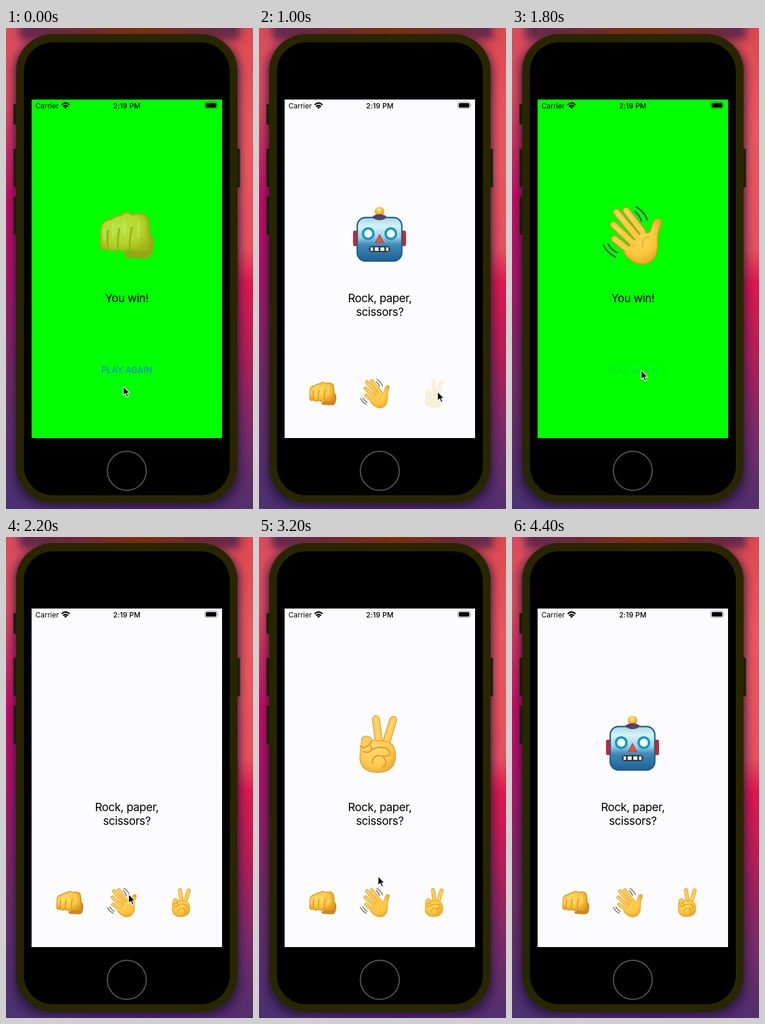
Animation, 415 px wide and 807 px high, one loop 4.6 s. Source, as an HTML page:

```html
<!DOCTYPE html>
<html lang="en">
<head>
<meta charset="utf-8">
<title>Rock, paper, scissors</title>
<style>
  html, body { margin: 0; width: 100%; height: 100%; overflow: hidden; background: #000; }
  svg { display: block; width: 415px; height: 807px; }
  text { font-family: Inter, Roboto, sans-serif; }
  .status { font-size: 12px; }
  .message { font-size: 19px; letter-spacing: -.42px; text-anchor: middle; }
  .again { font-size: 14.3px; letter-spacing: .15px; text-anchor: middle; fill: #007aff; }
</style>
</head>
<body>
<svg viewBox="0 0 415 807">
  <defs>
    <linearGradient id="wallLeft" x2="0" y2="1">
      <stop offset="0" stop-color="#d84c5c"/>
      <stop offset=".14" stop-color="#e04c5c"/>
      <stop offset=".25" stop-color="#d22c60"/>
      <stop offset=".36" stop-color="#cc0866"/>
      <stop offset=".52" stop-color="#b01468"/>
      <stop offset=".72" stop-color="#782c68"/>
      <stop offset="1" stop-color="#4a3270"/>
    </linearGradient>
    <linearGradient id="wallRight" x2="0" y2="1">
      <stop offset="0" stop-color="#dc484e"/>
      <stop offset=".2" stop-color="#ea565f"/>
      <stop offset=".46" stop-color="#e6505e"/>
      <stop offset=".53" stop-color="#dc184c"/>
      <stop offset=".68" stop-color="#b41e58"/>
      <stop offset=".83" stop-color="#7c2a66"/>
      <stop offset="1" stop-color="#50306c"/>
    </linearGradient>
    <linearGradient id="wallTop">
      <stop offset="0" stop-color="#642850"/>
      <stop offset=".25" stop-color="#702a38"/>
      <stop offset=".55" stop-color="#803008"/>
      <stop offset="1" stop-color="#642850"/>
    </linearGradient>
    <linearGradient id="wallBottom">
      <stop offset="0" stop-color="#4a3270"/>
      <stop offset=".6" stop-color="#602070"/>
      <stop offset="1" stop-color="#54306c"/>
    </linearGradient>
    <filter id="soft" filterUnits="userSpaceOnUse" x="-60" y="-60" width="535" height="927">
      <feGaussianBlur stdDeviation="7"/>
    </filter>
    <radialGradient id="skin" cx=".42" cy=".38" r=".72">
      <stop offset="0" stop-color="#ffd95e"/>
      <stop offset=".6" stop-color="#fcc53e"/>
      <stop offset="1" stop-color="#e39a1e"/>
    </radialGradient>
    <linearGradient id="metal" x2="0" y2="1">
      <stop offset="0" stop-color="#a9d6dc"/>
      <stop offset=".2" stop-color="#d2f4f8"/>
      <stop offset=".45" stop-color="#a2d0e2"/>
      <stop offset=".62" stop-color="#3f8bb8"/>
      <stop offset="1" stop-color="#1f6097"/>
    </linearGradient>
    <radialGradient id="bulb" cx=".45" cy=".3">
      <stop offset="0" stop-color="#fff08a"/>
      <stop offset="1" stop-color="#f2a51d"/>
    </radialGradient>

    <g id="rock" stroke-linecap="round" stroke-linejoin="round">
      <path fill="#cf8620" d="M-3 29C-5 35-2 38 6 38L32 39C40 39 43 32 45 22C47 12 46 4 40-3L20 20Z"/>
      <path fill="#dc9724" d="M-44-8C-45-20-36-29-26-28C-22-34-14-35-9-35C-4-41 4-41 9-36C18-38 30-40 36-31C40-20 39-12 40-3C42 10 40 22 32 26C24 29 12 28 6 24C0 29-11 28-14 24C-20 28-28 27-31 23C-38 27-45 23-45 15Z"/>
      <path fill="url(#skin)" d="M-42-8C-43-18-35-26-25-25C-21-31-13-32-8-32C-3-38 4-38 9-33C18-35 28-37 32-29C36-20 34-12 35-3C36 10 36 19 29 23C22 26 12 25 6 21C0 26-11 25-14 21C-20 25-28 24-31 20C-37 24-42 20-42 13Z"/>
      <path fill="none" stroke="#d99321" stroke-width="3" d="M-31 21C-33 12-32 2-31-8M-14 22C-16 10-14 0-12-11M6 22C4 8 7-2 9-13"/>
      <path fill="none" stroke="#ffe68c" stroke-width="4" opacity=".6" d="M-37-10V5M-22-18V2M-3-23V0M20-24V2"/>
    </g>

    <g id="paper" fill="none" stroke-linecap="round" stroke-linejoin="round">
      <path stroke="#dc9320" stroke-width="12" d="M-11-42L17-6M-27-39L9 4M-32-18L4 16M-30 6L0 30"/>
      <path fill="url(#skin)" stroke="#dc9320" stroke-width="1.5" d="M19-10C21-1 29-3 31-10C33-20 36-28 43-28C49-28 49-21 46-14C42-5 42 3 42 14C42 34 34 47 17 48C3 48-8 38-15 29Z"/>
      <path stroke="#fec848" stroke-width="9" d="M-11-42L17-6M-27-39L9 4M-32-18L4 16M-30 6L0 30"/>
      <path stroke="#e5a02c" stroke-width="1.6" d="M27 1C18 4 15 12 17 20"/>
      <path stroke="#ffe08a" stroke-width="2.6" opacity=".6" d="M-11-41L-1-28M-26-37L-13-22M-31-16L-20-6"/>
      <path stroke="#575757" stroke-width="2.6" d="M6-48Q19-41 25-26M4-40Q12-34 15-24M-49 16Q-42 30-29 36M-41 14Q-37 23-26 29"/>
    </g>

    <g id="scissors" fill="none" stroke-linecap="round" stroke-linejoin="round">
      <path stroke="#e09a28" stroke-width="13.5" d="M23-41L9 4M-6-42L0 4"/>
      <path stroke="#fec848" stroke-width="10.5" d="M23-41L9 4M-6-42L0 4"/>
      <path fill="url(#skin)" stroke="#e09a28" stroke-width="1.5" d="M-30-8C-27-17-16-15-12-7C-2-6 12-8 21 0C29 9 28 26 23 35C17 45 5 47-5 47C-22 47-33 38-33 22Z"/>
      <path stroke="#d98f22" stroke-width="2.2" d="M-32 3C-26 8-18 3-13-6M-15 2C-10 11-18 15-27 12M-13 9C0 2 13 5 17 11C20 18 12 22 4 19C-7 17-13 23-12 32M5 20C13 27 12 35 6 38"/>
      <path stroke="#ffe08a" stroke-width="3" opacity=".6" d="M22-39L13-11M-6-40L-2-11"/>
    </g>

    <g id="robot">
      <rect x="-44.5" y="-8" width="9" height="26" rx="3" fill="#c42836"/>
      <rect x="35.5" y="-8" width="9" height="26" rx="3" fill="#c42836"/>
      <circle cy="-40" r="8" fill="url(#bulb)"/>
      <rect x="-37.5" y="-30" width="75" height="73" rx="14" fill="url(#metal)" stroke="#245f8a" stroke-width="2.4"/>
      <path fill="#4f4270" d="M-12-31C-8-37 8-37 12-31C8-24-8-24-12-31Z"/>
      <g fill="#fff" stroke="#129ac8" stroke-width="4">
        <circle cx="-19" cy="-3" r="8.8"/><circle cx="19" cy="-3" r="8.8"/>
      </g>
      <path fill="#e2504c" stroke="#a93a42" stroke-linejoin="round" d="M0-2L7 12H-7Z"/>
      <rect x="-18" y="18" width="36" height="10" rx="5" fill="#33383d"/>
      <path stroke="#f4f7ee" stroke-width="6" d="M-15 23h4M-8 23h6.500M1.500 23h6.500M11 23h4"/>
    </g>
  </defs>

  <rect width="208" height="807" fill="url(#wallLeft)"/>
  <rect x="207" width="208" height="807" fill="url(#wallRight)"/>
  <rect y="785" width="415" height="22" fill="url(#wallBottom)"/>
  <rect x="22" y="-25" width="371" height="45" fill="url(#wallTop)" filter="url(#soft)"/>
  <rect x="13" y="16" width="380" height="788" rx="58" fill="#24123e" filter="url(#soft)" opacity=".8"/>

  <g fill="#1d1a12" stroke="#3a3420">
    <rect x="12.5" y="127.5" width="8" height="35" rx="2"/>
    <rect x="12.5" y="202.5" width="8" height="65" rx="2"/>
    <rect x="12.5" y="282.5" width="8" height="65" rx="2"/>
    <rect x="385" y="202.5" width="8" height="65" rx="2"/>
  </g>
  <rect x="17" y="10" width="372" height="787" rx="62" fill="#282600"/>
  <rect x="30" y="24" width="346" height="760" rx="49"/>
  <circle cx="203" cy="743" r="32.7" fill="none" stroke="#555559" stroke-width="2"/>
  <rect id="screen" x="43" y="120" width="320" height="568"/>

  <g class="status">
    <text x="49.5" y="134.5">Carrier</text>
    <text x="203" y="134.5" text-anchor="middle" font-weight="500" letter-spacing=".1">2:19 PM</text>
    <g fill="none" stroke="#000" stroke-width="2.3">
      <path d="M93.5 129Q100 122.5 106.8 129M96 132Q100 128 104.3 132"/>
      <path d="M97.7 133.2Q100 131 102.5 133.2L100 135.8Z" fill="#000" stroke="none"/>
    </g>
    <rect x="334" y="124.5" width="21" height="10.5" rx="3" fill="none" stroke="#000" opacity=".4"/>
    <rect x="335.7" y="126" width="17.6" height="7.5" rx="1.7"/>
    <path d="M356.3 128q1.7 1.7 0 3.5z" opacity=".4"/>
  </g>

  <use id="sign" transform="translate(202.5 348)"/>
  <text class="message" x="203" y="459.5" id="line1"></text>
  <text class="message" x="203" y="483" id="line2"></text>
  <text class="again" x="203" y="578.5" id="again">PLAY AGAIN</text>
  <g id="choices">
    <use href="#rock" transform="translate(107 613.5) scale(.5)"/>
    <use href="#paper" transform="translate(195 613.5) scale(.5)"/>
    <use href="#scissors" transform="translate(295.5 613.5) scale(.5)"/>
  </g>
  <path id="cursor" d="M0 0V15.5L3.6 12.3L6 18L8.6 16.9L6.3 11.4H11Z" stroke="#fff" stroke-width="1.2" stroke-linejoin="round"/>
</svg>
<script>
const STEP = 200, PRESSED = 0.2;
const modes = {
  win:  { color: '#00ff00', lines: ['You win!', ''] },
  lose: { color: '#ff0000', lines: ['You lose!', ''] },
  ask:  { color: '#fcfcfe', lines: ['Rock, paper,', 'scissors?'] }
};

// mode, sign, sign opacity, cursor x, cursor y, pressed control
const steps = [
  ['win', 'rock', 0.72, 197, 601],
  ['win', 'rock', 1, 197, 588],
  ['win', 'rock', 1, 198, 575, 'again'],
  ['ask', 'rock', 0.93, 198, 579],
  ['ask', 'robot', 0, 250, 598],
  ['ask', 'robot', 1, 300, 610, 'scissors'],
  ['win', 'robot', 0.68, 300, 610],
  ['win', 'paper', 0, 262, 594],
  ['win', 'paper', 0.7, 217, 574],
  ['win', 'paper', 1, 217, 574, 'again'],
  ['ask', 'paper', 0.9, 216, 576],
  ['ask', 'robot', 0, 206, 599],
  ['ask', 'robot', 1, 205, 601, 'paper'],
  ['lose', 'robot', 0, 205, 601],
  ['lose', 'scissors', 0.6, 200, 569],
  ['lose', 'scissors', 1, 200, 569, 'again'],
  ['ask', 'scissors', 0.9, 200, 569],
  ['ask', 'robot', 0, 200, 569],
  ['ask', 'robot', 0.8, 200, 569],
  ['ask', 'robot', 1, 215, 584],
  ['ask', 'robot', 1, 255, 625],
  ['ask', 'robot', 1, 322, 690],
  ['ask', 'robot', 1, 430, 810]
];

const el = Object.fromEntries(
  ['screen', 'sign', 'line1', 'line2', 'again', 'choices', 'cursor']
    .map(id => [id, document.getElementById(id)]));
let shown = -1;

function draw([modeName, sign, opacity, x, y, pressed]) {
  const mode = modes[modeName], asking = modeName === 'ask';
  el.screen.setAttribute('fill', mode.color);
  el.sign.setAttribute('href', '#' + sign);
  el.sign.setAttribute('opacity', opacity);
  [el.line1.textContent, el.line2.textContent] = mode.lines;
  el.again.style.display = asking ? 'none' : '';
  el.again.setAttribute('opacity', pressed === 'again' ? PRESSED : 1);
  el.choices.style.display = asking ? '' : 'none';
  for (const choice of el.choices.children)
    choice.setAttribute('opacity', choice.getAttribute('href') === '#' + pressed ? PRESSED : 1);
  el.cursor.setAttribute('transform', `translate(${x} ${y})`);
}

function tick() {
  const index = Math.floor(performance.now() / STEP) % steps.length;
  if (index !== shown) draw(steps[shown = index]);
  requestAnimationFrame(tick);
}
tick();
</script>
</body>
</html>
```
